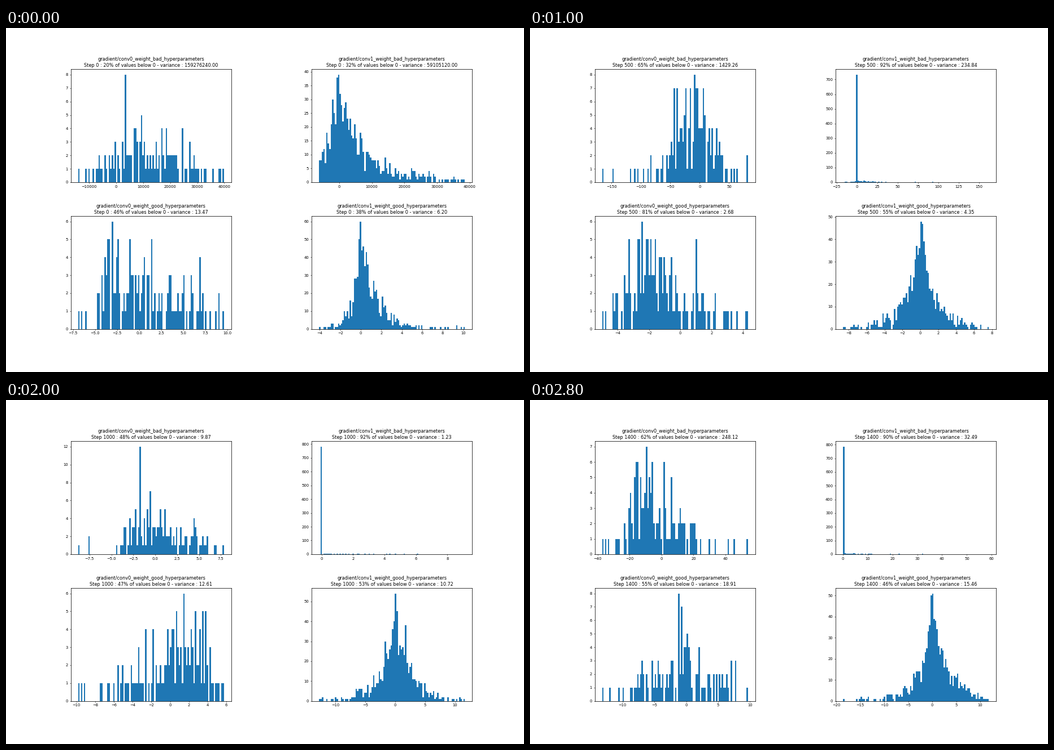
A matplotlib script for the animation above (3 s loop, 917x611 px).

```python
import numpy as np
import matplotlib.pyplot as plt
from matplotlib.animation import FuncAnimation

BINS = 100
FRAMES, INTERVAL = 15, 200
BLUE = "#1f77b4"
KEY_STEPS = [0, 100, 300, 500, 800, 1100, 1400]

plt.rcParams.update({"font.family": "DejaVu Sans", "font.size": 9.8,
                     "axes.linewidth": 1.1, "axes.titlepad": 6.5})


class Weights:
    """Histogram of one layer's gradients as a seeded random sample around a spike.

    Each key row holds: percent below 0, variance, lowest and highest value,
    tallest count, spread in bins left and right of it and, if it does not
    stand at zero, its bin.
    """

    def __init__(self, name, seed, total, power, rows):
        self.name, self.seed, self.total, self.power = name, seed, total, power
        rows = np.array(rows, float)
        rows[:, 1] = np.log(rows[:, 1])
        rows[:, 2:4] /= np.exp(rows[:, 1:2] / 2)  # range in standard deviations
        self.columns = rows.T

    def at(self, step):
        below, log_var, low, high, peak, left, right, *mode = (
            np.interp(step, KEY_STEPS, c) for c in self.columns)
        peak = round(peak)
        center = int(mode[0] if mode else -low / (high - low) * BINS)

        # two-sided decay, plus a wide share for the thin tails
        dist = np.arange(BINS) - center
        reach = np.abs(dist) / np.where(dist < 0, left, right)
        shape = np.exp(-reach ** self.power) + .04 * np.exp(-reach / 3)
        rng = np.random.default_rng(self.seed + step)
        counts = rng.poisson(shape / shape.sum() * (self.total - peak)).clip(0, peak - 1)
        counts[center] = peak
        counts[[0, -1]] = counts[[0, -1]].clip(1)

        var = np.exp(log_var)
        edges = np.linspace(low, high, BINS + 1) * np.sqrt(var)
        title = (f"gradient/{self.name}_hyperparameters\n"
                 f"Step {step} : {round(below)}% of values below 0 - variance : {var:.2f}")
        return title, edges, counts


panels = [
    Weights("conv0_weight_bad", 11, 150, 2, [
        (20, 159276240, -14100, 39900, 8, 16, 42, 32),
        (59, 233198.31, -1512, 1354, 8, 18, 24, 50),
        (49, 673.04, -52.8, 70, 7, 40, 20, 62),
        (65, 1429.26, -166.3, 82.2, 8, 22, 16, 63),
        (36, 133.71, -34.5, 27, 18, 10, 36, 50),
        (54, 2.68, -4.45, 4.24, 9, 14, 36, 38),
        (62, 248.12, -37.3, 54.2, 7, 14, 30, 30)]),
    Weights("conv1_weight_bad", 22, 864, 1, [
        (32, 59105120, -6267, 38590, 39, 9, 18),
        (47, 27421.76, -1227, 1052, 222, 2.3, 4.6),
        (92, 84.06, -9, 127, 780, 3, 22),
        (92, 234.84, -17.2, 162, 733, 3, 9),
        (94, 14.19, 0, 36.4, 815, 1, 40),
        (91, .36, -.135, 4.51, 765, 1, 35),
        (90, 32.49, 0, 58.9, 785, 1, 18)]),
    Weights("conv0_weight_good", 33, 150, 2, [
        (46, 13.47, -6.93, 9.63, 6, 12, 52, 23),
        (59, 34.94, -17.2, 4.87, 8, 30, 16, 78),
        (52, 6.21, -7.27, 3.77, 6, 55, 16, 74),
        (81, 2.68, -5.01, 4.34, 6, 16, 36, 27),
        (39, 21.05, -11.4, 7.9, 5, 40, 18, 78),
        (51, 9.76, -9.1, 4.9, 6, 36, 26, 69),
        (55, 18.91, -13.2, 9.7, 8, 24, 30, 52)]),
    Weights("conv1_weight_good", 44, 864, 1, [
        (38, 6.20, -4.08, 10.16, 60, 4.5, 9.5),
        (55, 13.41, -16.66, 8.43, 69, 6.5, 5.5),
        (57, 7.46, -14.5, 5.67, 83, 7, 4),
        (55, 4.35, -8.65, 7.66, 48, 9, 8.5),
        (54, 13.01, -15.3, 13.6, 71, 6, 6),
        (53, 9.73, -11.67, 10.8, 45, 10, 10.5),
        (46, 15.46, -18.6, 11.8, 51, 8, 9)]),
]

fig, axes = plt.subplots(2, 2, figsize=(18.34, 12.22), dpi=50, facecolor="white")
fig.subplots_adjust(left=.125, right=.9, bottom=.125, top=.88, wspace=.5, hspace=.3)


def draw(i):
    for ax, panel in zip(axes.flat, panels):
        title, edges, counts = panel.at(100 * i)
        ax.cla()
        ax.bar(edges[:-1], counts, np.diff(edges), align="edge", color=BLUE)
        ax.set_title(title)
    return []


anim = FuncAnimation(fig, draw, frames=FRAMES, interval=INTERVAL, repeat=True, repeat_delay=0)
plt.show()
```
